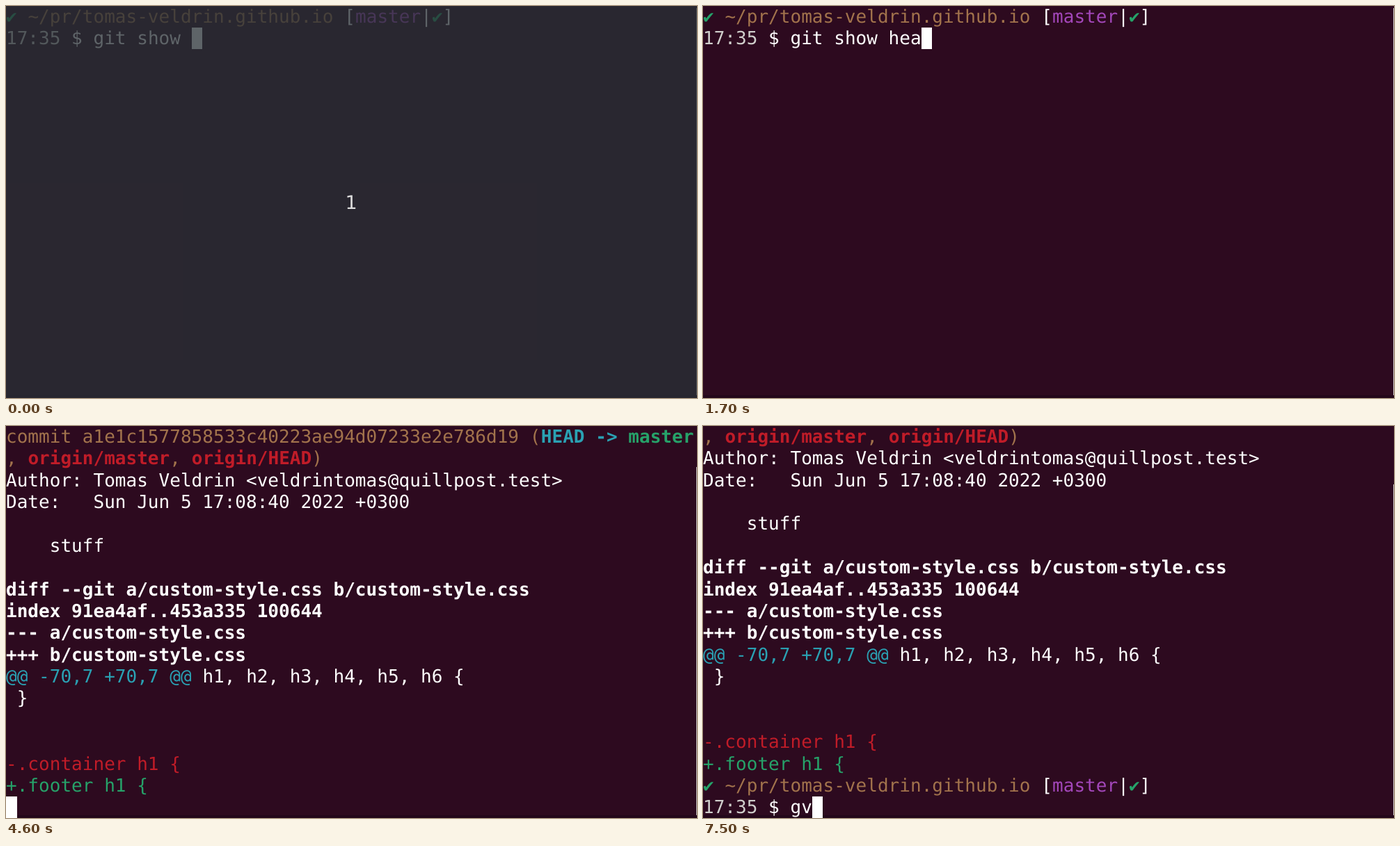
Animation of 993 by 564 pixels, one loop 8 s. Source, as an HTML page:

```html
<!DOCTYPE html>
<html lang="en">
<head>
<meta charset="utf-8">
<title>Terminal: git show</title>
<style>
  html, body { margin: 0; width: 100%; height: 100%; overflow: hidden; background: #2d0a1f; }
  svg { display: block; width: 993px; height: 564px; }
  text {
    font: 26.06px "DejaVu Sans Mono", monospace;
    white-space: pre;
    text-rendering: geometricPrecision;
    fill: #fff;
  }
  .bold { font-weight: bold; }
  .brown { fill: #a2734c; }
  .purple { fill: #a347ba; }
  .green { fill: #26a269; }
  .red { fill: #c01c28; }
  .cyan { fill: #2aa1b3; }
  .grey { fill: #d0cfcc; }
  #count { font: 27px "DejaVu Sans", sans-serif; fill: #dcdcdc; text-anchor: middle; }
</style>
</head>
<body>
<svg viewBox="0 0 993 564">
  <rect width="993" height="564" fill="#2d0a1f"/>
  <rect y="560" width="993" height="4" fill="#23071a"/>
  <rect id="bar" x="992" width="1" fill="#cfcac8"/>
  <g id="screen"></g>
  <rect id="cursor" width="15" fill="#fff"/>
  <g id="countdown">
    <rect width="993" height="564" fill="rgb(41,49,54)" fill-opacity=".75"/>
    <text id="count" x="496" y="292">1</text>
  </g>
</svg>
<script>
const LOOP = 8000, CELL = 15.69, ROW = 31.37, TOP = -0.7, BASELINE = 24.7;
const $ = id => document.getElementById(id);

// A line is a list of [text, classes] runs.
const PROMPT = [
  ['✔', 'green'], [' '], ['~/pr/tomas-veldrin.github.io', 'brown'], [' ['],
  ['master', 'purple'], ['|'], ['✔', 'green'], [']']
];
const command = typed => [['17:35', 'grey'], [' $ ' + typed]];
const COMMIT = [
  [['commit a1e1c1577858533c40223ae94d07233e2e786d19 (', 'brown'],
    ['HEAD -> ', 'bold cyan'], ['master', 'bold green']],
  [[', ', 'brown'], ['origin/master', 'bold red'], [', ', 'brown'],
    ['origin/HEAD', 'bold red'], [')', 'brown']],
  [['Author: Tomas Veldrin <veldrintomas@quillpost.test>']],
  [['Date:   Sun Jun 5 17:08:40 2022 +0300']],
  [],
  [['    stuff']],
  [],
  [['diff --git a/custom-style.css b/custom-style.css', 'bold']],
  [['index 91ea4af..453a335 100644', 'bold']],
  [['--- a/custom-style.css', 'bold']],
  [['+++ b/custom-style.css', 'bold']],
  [['@@ -70,7 +70,7 @@', 'cyan'], [' h1, h2, h3, h4, h5, h6 {']],
  [[' }']],
  [],
  [],
  [['-.container h1 {', 'red']],
  [['+.footer h1 {', 'green']]
];

const SCREENS = {
  shell: { barTop: 3, lines: typed => [PROMPT, command(typed)] },
  pager: { barTop: 59, lines: typed => [...COMMIT, [[typed]]] },
  after: { barTop: 84, lines: typed => [...COMMIT.slice(1), PROMPT, command(typed)] }
};

// start time, screen, text on the last line, cursor column (-1 hides it)
const STEPS = [
  [0, 'shell', 'git show ', 17],
  [300, 'shell', 'git show ', -1],
  [500, 'shell', 'git show', 16],
  [1100, 'shell', 'git show', -1],
  [1400, 'shell', 'git show h', 18],
  [1500, 'shell', 'git show he', 19],
  [1700, 'shell', 'git show hea', 20],
  [2100, 'shell', 'git show he', 19],
  [2300, 'shell', 'git show h', 18],
  [2400, 'shell', 'git show ', 17],
  [2600, 'shell', 'git show HE', 19],
  [2800, 'shell', 'git show HEA', 20],
  [3000, 'shell', 'git show HEAD', 21],
  [3300, 'pager', ':', 1],
  [4000, 'pager', ':', -1],
  [4500, 'pager', ':', 1],
  [4600, 'pager', '', 0],
  [4700, 'after', '', 8],
  [5200, 'after', '', -1],
  [5300, 'after', 'g', 9],
  [5900, 'after', 'g', -1],
  [6200, 'after', 'g', 9],
  [6300, 'after', 'gv', 10],
  [6800, 'after', 'gv', -1],
  [7500, 'after', 'gv', 10]
];

function setAttrs(node, attrs) {
  for (const name in attrs) node.setAttribute(name, attrs[name]);
  return node;
}

function lineNodes(runs, row) {
  let col = 0;
  return runs.map(([content, style = '']) => {
    const node = document.createElementNS('http://www.w3.org/2000/svg', 'text');
    setAttrs(node, { x: col * CELL, y: TOP + row * ROW + BASELINE, class: style });
    node.textContent = content;
    col += content.length;
    return node;
  });
}

function show([, name, typed, col]) {
  const { barTop, lines } = SCREENS[name];
  const rows = lines(typed);
  $('screen').replaceChildren(...rows.flatMap(lineNodes));
  setAttrs($('bar'), { y: barTop, height: 560 - barTop });
  const top = Math.round(TOP + (rows.length - 1) * ROW);
  setAttrs($('cursor'), {
    x: Math.round(col * CELL), y: top, height: 31,
    width: col ? 15 : 16,
    visibility: col < 0 ? 'hidden' : 'visible'
  });
}

const start = performance.now();
let shown;

function tick() {
  const time = (performance.now() - start) % LOOP;
  const step = STEPS.findLast(([from]) => from <= time);
  if (step !== shown) show(shown = step);
  $('countdown').setAttribute('visibility', time < 100 ? 'visible' : 'hidden');
  requestAnimationFrame(tick);
}
tick();
</script>
</body>
</html>
```
